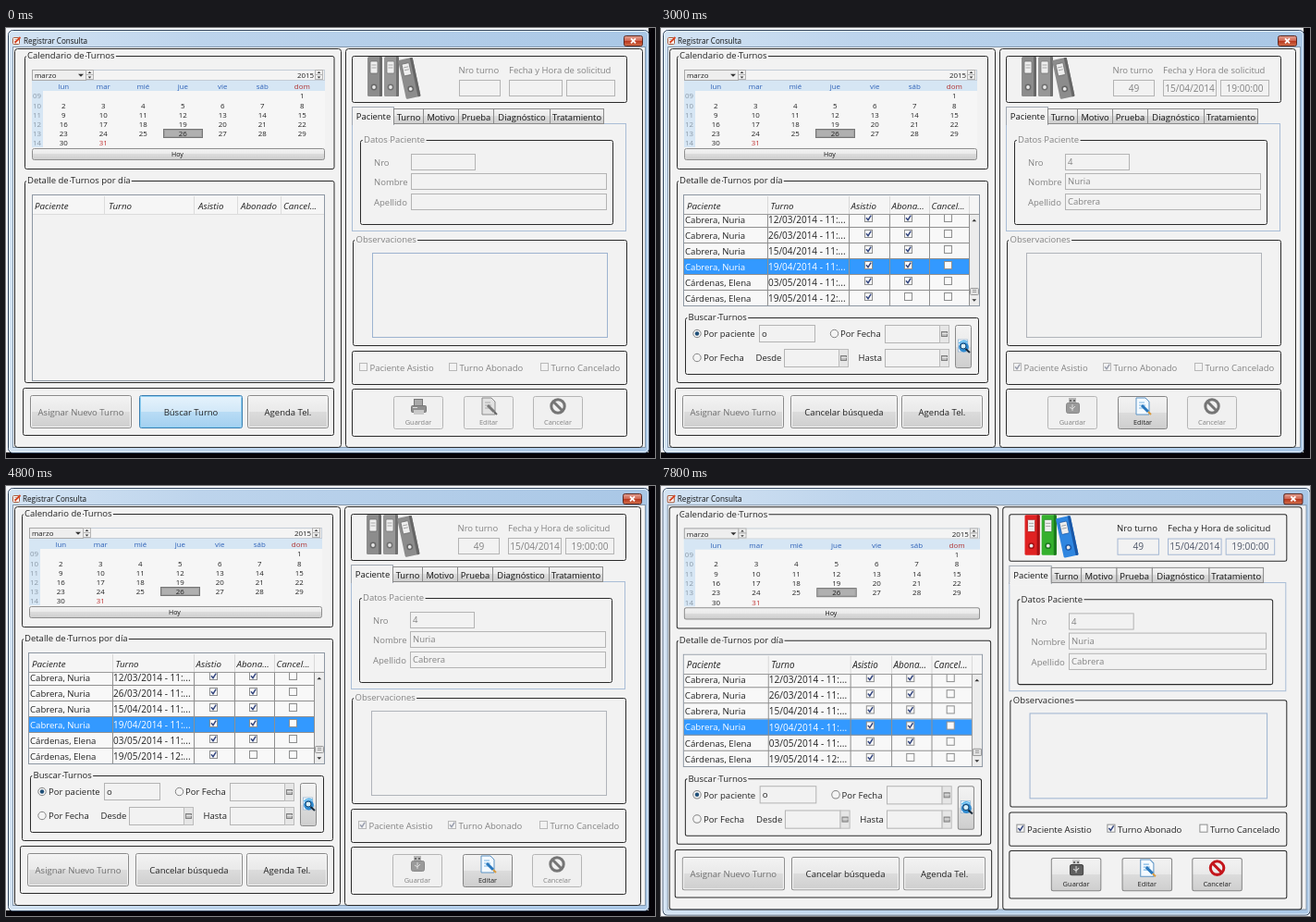
An HTML page that plays this animation: 702x465 px, repeating every 9000 ms.

```html
<!DOCTYPE html>
<html lang="es">
<head>
<meta charset="utf-8">
<title>Registrar Consulta</title>
<style>
html, body { margin: 0; width: 100%; height: 100%; overflow: hidden; background: #f4f6fa; }
svg { display: block; width: 702px; height: 465px; font-family: "Open Sans", "Noto Sans", sans-serif; white-space: pre; }
</style>
</head>
<body>
<svg viewBox="0 0 702 465" xmlns="http://www.w3.org/2000/svg">
  <defs>
    <linearGradient id="frame" x2="1" y2="0">
      <stop offset="0" stop-color="#d3e3f3"/><stop offset=".3" stop-color="#bdd4ec"/><stop offset="1" stop-color="#a9c7e6"/>
    </linearGradient>
    <linearGradient id="btn" x2="0" y2="1">
      <stop offset="0" stop-color="#f3f3f3"/><stop offset=".5" stop-color="#e9e9e9"/>
      <stop offset=".5" stop-color="#dcdcdc"/><stop offset="1" stop-color="#cecece"/>
    </linearGradient>
    <linearGradient id="hot" x2="0" y2="1">
      <stop offset="0" stop-color="#e6f3fc"/><stop offset=".5" stop-color="#d2e8f8"/>
      <stop offset=".5" stop-color="#b9dcf5"/><stop offset="1" stop-color="#a3d0f0"/>
    </linearGradient>
    <linearGradient id="close" x2="0" y2="1">
      <stop offset="0" stop-color="#e3a394"/><stop offset=".5" stop-color="#cf6450"/>
      <stop offset=".5" stop-color="#b8351c"/><stop offset="1" stop-color="#d2714d"/>
    </linearGradient>
    <clipPath id="rows"><rect x="25" y="202" width="309" height="98"/></clipPath>
  </defs>
  <g id="stage"></g>
</svg>
<script>
const BG = '#f2f2f2', INK = '#222', DIM = '#838383', LINE = '#2a2a2a';
const stage = document.getElementById('stage');
const STEP = 3000, STATES = 3;
const PATIENT = ['Cabrera', 'Nuria'];

const rect = (x, y, w, h, fill, stroke = 'none', r = 0) =>
  `<rect x="${x + .5}" y="${y + .5}" width="${w}" height="${h}" rx="${r}" fill="${fill}" stroke="${stroke}"/>`;
const fillRect = (x, y, w, h, fill) => `<rect x="${x}" y="${y}" width="${w}" height="${h}" fill="${fill}"/>`;
const path = (d, stroke, w = 1, fill = 'none') =>
  `<path d="${d}" stroke="${stroke}" stroke-width="${w}" fill="${fill}"/>`;
const move = (x, y, body, more = '') => `<g transform="translate(${x} ${y}) ${more}">${body}</g>`;

// y is the middle of the line
function text(x, y, s, fill = INK, size = 9.5, anchor = 'start', extra = '') {
  return `<text x="${x}" y="${y + size * .36}" font-size="${size}" fill="${fill}" text-anchor="${anchor}" ${extra}>${s}</text>`;
}
const mid = (x, y, s, fill, size) => text(x, y, s, fill, size, 'middle');

function group(x, y, w, h, title, tx, fill = INK) {
  const halo = `stroke="${BG}" stroke-width="4" paint-order="stroke"`;
  return rect(x, y, w, h, 'none', LINE, 2) + (title ? text(tx, y, title, fill, 9.5, 'start', halo) : '');
}

function field(x, y, w, h, value = '', fill = DIM, border = '#b4b4b4') {
  return rect(x, y, w, h, BG, border) + text(x + 3, y + h / 2 + .5, value, fill);
}

function check(x, y, on, live = true) {
  return rect(x, y, 8, 8, live ? '#fafafa' : BG, live ? '#8e8f8f' : '#b8b8b8') +
    (on ? path(`M${x + 2} ${y + 4.3}l2 2.4 3.2-5`, live ? '#35477f' : '#9a9fae', 1.5) : '');
}

function radio(x, y, on) {
  return `<circle cx="${x}" cy="${y}" r="4.2" fill="#f4f4f4" stroke="#858585"/>` +
    (on ? `<circle cx="${x}" cy="${y}" r="2.2" fill="#1f4f78"/>` : '');
}

function button(x, y, w, h, label, fill = INK, skin = 'btn') {
  return rect(x, y, w, h, `url(#${skin})`, skin === 'hot' ? '#3c7fb1' : '#8a8a8a', 2) +
    rect(x + 1, y + 1, w - 2, h - 2, 'none', skin === 'hot' ? '#8fd0f3' : '#f6f6f6', 1) +
    mid(x + w / 2 + .5, y + h / 2 + 1, label, fill);
}

const tri = (x, y, r, up, fill = '#333') =>
  `<path d="M${x - r} ${y + (up ? r / 2 : -r / 2)}h${2 * r}l${-r} ${up ? -r : r}z" fill="${fill}"/>`;

function spinner(x, y) {
  return rect(x, y, 8, 5, '#eee', '#b5b5b5') + rect(x, y + 5, 8, 5, '#eee', '#b5b5b5') +
    tri(x + 4.5, y + 3, 1.8, true) + tri(x + 4.5, y + 8.5, 1.8, false);
}

function frame(dx) {
  const icon = rect(7, 10, 7, 7, '#fff', '#a85b3c', 1) + path('M9 12.5h4M9 14.5h3', '#999', .7) +
    path('M9.5 16l6-6', '#d8421f', 1.8);
  return rect(2, 2, 693, 457, 'url(#frame)', '#31445c', 5) + rect(3, 3, 691, 455, 'none', '#e6f0fa', 4) +
    rect(7, 20, 684, 433, BG, '#8497ab') + icon + text(18 + dx, 14, 'Registrar Consulta', '#111', 8.1) +
    rect(667 + dx, 8, 20, 11, 'url(#close)', '#5c2a24', 2) +
    path(`M${675 + dx} 11.3l5 5m0-5l-5 5`, '#fff', 1.8) +
    rect(9, 22, 352 + dx, 431, 'none', LINE, 3) + rect(366 + dx, 22, 320 + dx, 431, 'none', LINE, 3);
}

function calendar(dx) {
  const S = 7.9, col = i => 59.3 + 43 * i, row = i => 73.5 + 10.2 * i;
  let s = group(17, 30, 336 - dx / 2, 122, 'Calendario de Turnos', 20);
  s += fillRect(25, 45, 317, 84, '#f6f6f6') + rect(25, 45, 316, 11, '#f4f4f4', '#c3ccd6') +
    rect(25, 45, 58, 11, '#eee', '#a9a9a9') + text(28, 51.2, 'marzo', INK, S) + tri(78, 51.3, 3, false) +
    spinner(83, 45) + text(330, 51.2, '2015', INK, S, 'end') + spinner(331, 45);
  s += fillRect(25, 57, 317, 11, '#d6e6f4') + fillRect(25, 57, 12, 72, '#d6e6f4');
  ['lun', 'mar', 'mié', 'jue', 'vie', 'sáb', 'dom'].forEach((d, i) => {
    s += mid(col(i), 63, d, i === 6 ? '#b03030' : '#2f62b8', S);
  });
  for (let i = 0; i < 6; i++) s += mid(30.5, row(i), String(9 + i).padStart(2, '0'), '#8a98a6', S);
  s += rect(167, 109, 42, 9, '#b0b0b0', '#777') + rect(168, 110, 40, 7, 'none', '#a0a0a0');
  for (let d = 1; d <= 31; d++) {
    const n = d + 5;
    s += mid(col(n % 7), row(Math.floor(n / 7)), d, d === 31 ? '#c03030' : INK, S);
  }
  return s + rect(25, 130, 316, 12, 'url(#btn)', '#8f8f8f', 2) + mid(182.5, 136.5, 'Hoy', '#111', 7);
}

function header(x, cols) {
  return cols.map(([at, s]) => text(at, 192, s, INK, 9.8, 'start', 'font-style="italic"')).join('');
}

function emptyTable() {
  let s = rect(28, 180, 316, 201, BG, '#8d97a3') + fillRect(29, 181, 315, 20, '#f6f6f6') +
    path('M29 201.5h315', '#dcdcdc');
  for (const x of [106, 203, 250, 297]) s += path(`M${x}.5 182v19`, '#dcdcdc');
  return s + header(0, [[31, 'Paciente'], [111, 'Turno'], [208, 'Asistio'], [254, 'Abonado'], [300, 'Cancel...']]);
}

function fullTable() {
  const dates = ['12/03/2014 - 11', '26/03/2014 - 11', '15/04/2014 - 11', '19/04/2014 - 11', '03/05/2014 - 11', '19/05/2014 - 12'];
  const cols = [115, 203, 247, 290, 333];
  let s = rect(24, 180, 320, 120, '#f8f8f8', '#8d97a3') + fillRect(25, 181, 319, 20, '#f5f5f5'), body = '';
  dates.forEach((d, i) => {
    const y = 207.3 + 17 * i, on = i === 3, ink = on ? '#fff' : INK;
    if (on) body += fillRect(25, y - 8.3, 308, 17, '#3399ff');
    body += path(`M25 ${Math.round(y + 8) + .5}H333`, '#8f8f8f') +
      text(26, y, i < 4 ? PATIENT.join(', ') : 'Cárdenas, Elena', ink, 9.6) + text(116, y, d + ':...', ink, 10);
    [220, 263, 306].forEach((x, k) => body += check(x, Math.round(y) - 6, k === 0 || (k === 1 && i < 5)));
  });
  for (const x of cols) {
    s += path(`M${x}.5 182v19`, '#d8d8d8');
    body += path(`M${x}.5 202V300`, '#8f8f8f');
  }
  s += `<g clip-path="url(#rows)">${body}</g>` + path('M25 201.5h319', '#9a9a9a');
  s += fillRect(334, 202, 10, 98, '#ececec') + tri(338.8, 208, 2.4, true) + tri(338.8, 294.5, 2.4, false) +
    rect(334, 281, 9, 7, '#e2e2e2', '#999', 1) + path('M337 283.5h4m-4 2h4', '#888', .8);
  return s + header(0, [[28, 'Paciente'], [118.5, 'Turno'], [205.5, 'Asistio'], [249.5, 'Abona...'], [292.5, 'Cancel...']]);
}

function dateField(x, y) {
  return field(x, y, 59, 19) + rect(x + 59, y, 10, 19, '#e6e6e6', '#bcbcbc') +
    rect(x + 61, y + 7, 6, 5, '#bbb', '#808080') + path(`M${x + 62} ${y + 9.5}h6`, '#eee', .8);
}

function searchBox() {
  const lens = move(327.5, 344, `<rect x="-6" y="-7" width="10" height="13" fill="#f8fbff" stroke="#8fb0cf" stroke-width=".7"/>` +
    `<circle r="5.4" cy="1" fill="#2e8ad0"/><circle r="3" cy="0" cx="-.5" fill="#d9f1ff" stroke="#14436e"/>` +
    path('M2 3l4.5 4', '#1a2a3a', 2) + path('M-5-3a6 6 0 0 1 9-1', '#58b7ee', 1.6));
  return group(26, 313, 317, 61, 'Buscar Turnos', 29.5) +
    radio(39, 330.5, true) + text(46, 331, 'Por paciente') + field(106, 321, 60, 18, 'o', INK) +
    radio(187.5, 330.5) + text(194, 331, 'Por Fecha') + dateField(242, 321) +
    radio(39, 356.5) + text(46, 357, 'Por Fecha') + text(102.5, 357, 'Desde') + dateField(133, 347) +
    text(213.5, 357, 'Hasta') + dateField(242, 347) +
    rect(318, 321, 17, 46, 'url(#btn)', '#8a8a8a', 2) + lens;
}

function binder(x, y, color, dark, turn = 0) {
  return move(x, y, `<rect width="16" height="43" rx="1.5" fill="${color}"/>` +
    `<path d="M13 0h2q1 0 1 1v41q0 1-1 1h-2z" fill="${dark}"/>` +
    `<rect x="3" y="5" width="8" height="13" rx="1" fill="#eee" stroke="${dark}" stroke-width=".7"/>` +
    path('M4.5 9h5m-5 3h5', '#999', .8) +
    `<circle cx="7" cy="33" r="3.4" fill="${dark}"/><circle cx="7" cy="33" r="1.9" fill="#e8e8e8"/>`, `rotate(${turn})`);
}

const ICONS = {
  printer: () => rect(-5, -8, 9, 7, '#a9a9a9', '#777') + rect(-8, -1, 16, 7, '#8f8f8f', '#777', 1) +
    fillRect(-5, 4, 11, 5, '#c9c9c9') + path('M-6 1.5h5', '#ddd'),
  usb: on => fillRect(-4, -9, 8, 6, on ? '#cfcfcf' : '#b5b5b5') + path('M-2-7v2m4-2v2', '#555', 1.6) +
    rect(-7, -4, 14, 11, on ? '#5f5f5f' : '#9a9a9a', on ? '#444' : '#888', 2) +
    path('M0 5v-7m-3 3l3 2 3-3', '#ddd', 1),
  edit: on => `<path d="M-7-9H3l4 4V9H-7z" fill="${on ? '#f4faff' : '#e2e2e2'}" stroke="${on ? '#5c93c4' : '#8b8b8b'}"/>` +
    path('M-4-4h6m-6 3h7m-7 3h5', on ? '#7db6e4' : '#aaa', 1.2) +
    path('M-1-1l7 7', on ? '#2a78bd' : '#777', 3) + path('M6 6l3 3', on ? '#d99a3d' : '#666', 2),
  stop: on => `<circle r="7.2" fill="none" stroke="${on ? '#c4161c' : '#757575'}" stroke-width="3"/>` +
    path('M-5-5L5 5', on ? '#c4161c' : '#757575', 3)
};

function iconButton(x, w, label, icon, on) {
  return rect(x, 398, w, 35, on ? 'url(#btn)' : '#f0f0f0', on ? '#858585' : '#b5b5b5', 2) +
    move(x + w / 2 + .5, 409, ICONS[icon](on)) + mid(x + w / 2 + .5, 426.5, label, on ? INK : DIM, 7.4);
}

function leftSide(n) {
  const dx = n ? 0 : 3;
  let s = move(dx, 0, calendar(dx));
  s += group(17 + dx, 165, 336 - dx / 2, 218, 'Detalle de Turnos por día', 20 + dx);
  s += n ? fullTable() + searchBox() : emptyTable();
  s += rect(15 + dx, 389, 339 - dx, 51, 'none', LINE, 2);
  s += button(23 + dx, 397, 109, 35, 'Asignar Nuevo Turno', '#6f6f6f');
  s += n ? button(140, 397, 115, 35, 'Cancelar búsqueda') : button(144, 397, 111, 35, 'Búscar Turno', INK, 'hot');
  return s + button(n ? 260 : 261, 397, 87, 35, 'Agenda Tel.');
}

function tabs() {
  let x = 374, s = rect(373, 103, 296, 116, BG, '#a9bdd6');
  [['Paciente', 44], ['Turno', 32], ['Motivo', 38], ['Prueba', 38], ['Diagnóstico', 61], ['Tratamiento', 58]].forEach(([name, w], i) => {
    s += i ? rect(x, 87, w, 16, 'url(#btn)', '#8c8c8c') : rect(x - 1, 85, w + 1, 19, BG, '#a0a8b2') + fillRect(x, 103, w, 3, BG);
    s += mid(x + w / 2 + .5, i ? 96.5 : 95.5, name, '#111', 9.4);
    x += w;
  });
  return s;
}

function rightSide(n) {
  const live = n === 2, ink = live ? INK : DIM, val = live ? '#50586a' : DIM;
  const edge = live ? '#a5b8d4' : '#b4b4b4';
  const [last, first] = n ? PATIENT : ['', ''];
  const hues = live ? [['#e02222', '#a30f12'], ['#35b02e', '#1c7a1d'], ['#2f86e0', '#1a57a6']]
    : [['#8c8c8c', '#686868'], ['#979797', '#707070'], ['#8c8c8c', '#666']];
  let s = rect(373, 30, 297, 50, 'none', LINE, 2) + binder(390, 31, ...hues[0]) +
    binder(408, 31, ...hues[1]) + binder(423, 35, ...hues[2], -12);
  s += text(488.5, 45.5, 'Nro turno', ink) + text(543, 45.5, 'Fecha y Hora de solicitud', ink);
  [[489, 44, '49'], [543, 57, '15/04/2014'], [605, 52, '19:00:00']].forEach(([x, w, v]) => {
    s += field(x, 56, w, 17, '', val, edge) + (n ? mid(x + w / 2 + .5, 65, v, val, 10.1) : '');
  });
  s += tabs() + group(382, 121, 273, 91, 'Datos Paciente', 386, ink);
  [['Nro', 136, 69, n ? '4' : ''], ['Nombre', 157, 211, first], ['Apellido', 179, 211, last]].forEach(([name, y, w, v]) => {
    s += text(397, y + 9.5, name, DIM) + field(437, y, w, 17, v);
  });
  s += group(374, 229, 296, 114, 'Observaciones', 377.5, ink) + rect(395, 243, 254, 91, BG, n === 1 ? '#b0b4ba' : '#9db3d0');
  s += rect(373, 349, 297, 36, 'none', LINE, 2);
  [[381, 'Paciente Asistio'], [478, 'Turno Abonado'], [577, 'Turno Cancelado']].forEach(([x, name], i) => {
    s += check(x, 362, n && i < 2, live) + text(x + 11.5, 367.5, name, ink);
  });
  s += rect(373, 390, 297, 51, 'none', LINE, 2);
  return s + iconButton(418, 53, 'Guardar', n ? 'usb' : 'printer', live) +
    iconButton(494, 53, 'Editar', 'edit', n > 0) + iconButton(569, 53, 'Cancelar', 'stop', live);
}

function scene(n) {
  const dx = n ? 0 : 1;
  const win = frame(dx) + leftSide(n) + move(dx, 0, rightSide(n));
  if (n === 2) return move(-.4, 0, win, 'scale(1.01)');
  return fillRect(695, 0, 7, 465, '#050308') + fillRect(0, 459, 702, 6, '#050308') + win;
}

let shown = -1;
function draw() {
  const n = Math.floor(performance.now() / STEP) % STATES;
  if (n !== shown) stage.innerHTML = scene(shown = n);
  requestAnimationFrame(draw);
}
draw();
</script>
</body>
</html>
```
